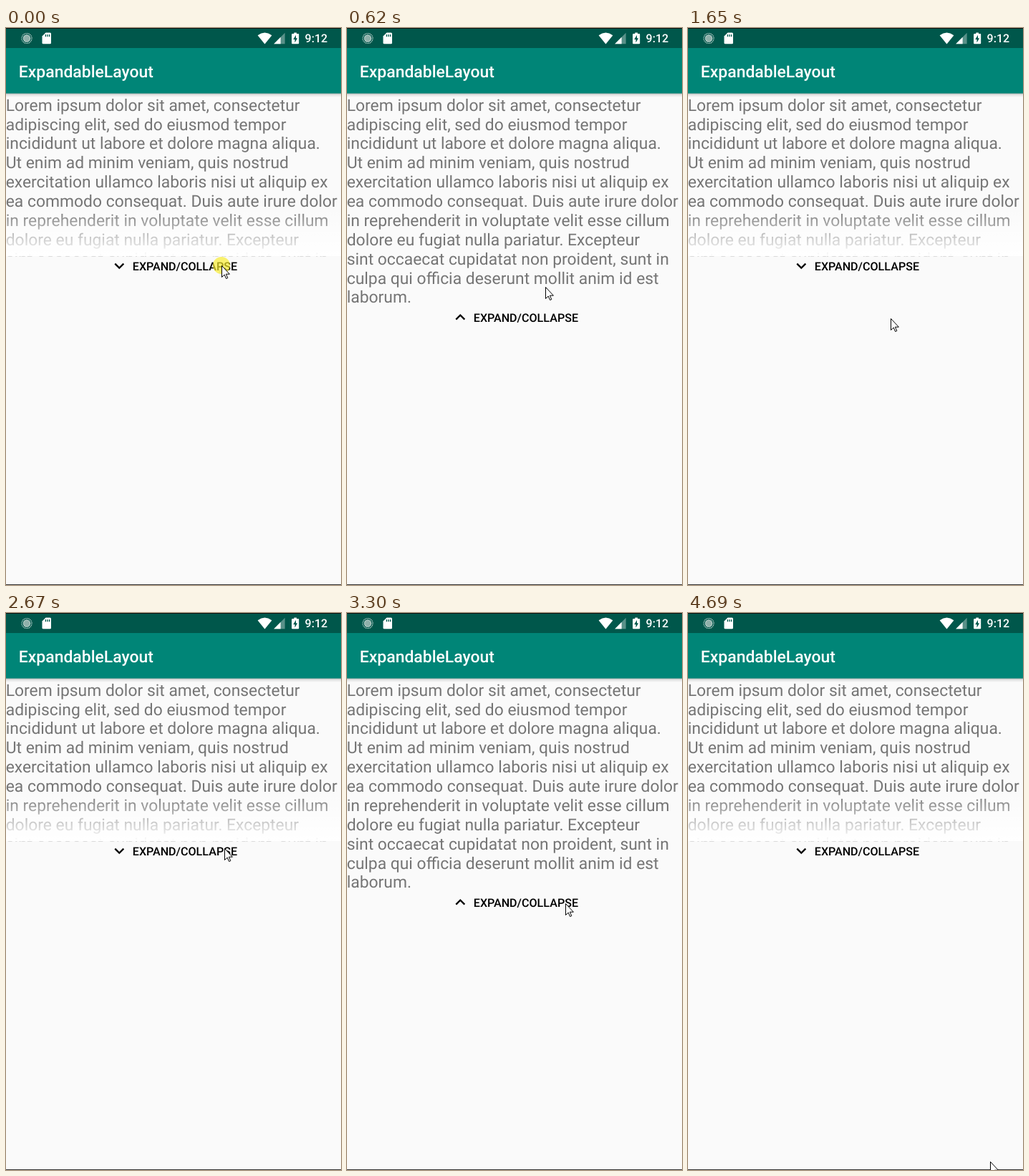
An HTML page that plays this animation: 468 by 779 pixels, repeating every 4770 ms.

```html
<!DOCTYPE html>
<html lang="en">
<head>
<meta charset="utf-8">
<title>Expandable layout</title>
<style>
  html, body { margin: 0; width: 100%; height: 100%; overflow: hidden; background: #fafafa; }
  svg { display: block; width: 100%; height: 100%; }
  text { font-family: Roboto, "Noto Sans", sans-serif; text-rendering: geometricPrecision; white-space: pre; }
  .bold { font-weight: 500; }
</style>
</head>
<body>
<svg viewBox="0 0 468 779">
  <defs>
    <linearGradient id="fadeFill" x2="0" y2="1">
      <stop offset="0" stop-color="#fff" stop-opacity="0"/>
      <stop offset="1" stop-color="#fff"/>
    </linearGradient>
    <linearGradient id="shadowFill" x2="0" y2="1">
      <stop offset="0" stop-opacity=".3"/>
      <stop offset=".4" stop-opacity=".1"/>
      <stop offset="1" stop-opacity="0"/>
    </linearGradient>
    <clipPath id="panelClip"><rect id="panel" y="91" width="468" height="228"/></clipPath>
  </defs>

  <rect width="468" height="779" fill="#fafafa"/>
  <g clip-path="url(#panelClip)">
    <g id="body" font-size="22.86" fill="#757575"></g>
    <rect id="fade" width="468" height="68" fill="url(#fadeFill)"/>
  </g>

  <g id="button">
    <path id="chevron" d="M4.59-3.41 0 1.17-4.59-3.41-6-2 0 4 6-2z"/>
    <text class="bold" x="249.9" y="20" font-size="16.1" text-anchor="middle">EXPAND/COLLAPSE</text>
  </g>

  <rect y="91" width="468" height="6" fill="url(#shadowFill)"/>
  <rect y="28" width="468" height="63.5" fill="#008577"/>
  <text class="bold" x="17.8" y="68.7" font-size="22.95" fill="#fff">ExpandableLayout</text>

  <rect width="468" height="28" fill="#00574b"/>
  <g fill="#fff">
    <g fill="none" stroke="#c4d8d4">
      <circle cx="29" cy="14.5" r="5.2" stroke="none" fill="#8fb0aa"/>
      <circle cx="29" cy="14.5" r="7" stroke-width="1.2" stroke-dasharray="1.3 .9"/>
      <circle cx="29" cy="14.5" r="4.6" stroke-width="1.2" stroke-dasharray="1.2 .8"/>
    </g>
    <path d="M55.5 6.5H61.5Q63 6.5 63 8V20.7Q63 22.2 61.5 22.2H52Q50.5 22.2 50.5 20.7V11.5z"/>
    <path d="M55.4 9v3.2M58 9v3.2M60.6 9v3.2" stroke="#00574b" stroke-width="1.3"/>
    <path d="M351.6 10.2Q361.5 2.8 371.4 10.2L361.5 22.4z"/>
    <path d="M389.6 6.8V22.2H374.2z" opacity=".35"/>
    <path d="M383.6 12.8V22.2H374.2z"/>
    <path d="M402.3 6.4H406V8H408.2Q409.2 8 409.2 9V21.3Q409.2 22.3 408.2 22.3H400.1Q399.1 22.3 399.1 21.3V9Q399.1 8 400.1 8H402.3z"/>
    <path d="M405 9.8 401.3 15.9H403.5V20.4L407.1 14.2H405z" fill="#00574b"/>
    <text class="bold" x="417.6" y="20.4" font-size="16">9:12</text>
  </g>
  <rect width="468" height="1" fill="#111"/>
  <rect y="778" width="468" height="1" fill="#333"/>

  <circle id="press" r="12" fill="#f8ec2c" opacity=".68"/>
  <path id="cursor" d="M.5.5V16.5L4.2 13 6.6 18.5 8.8 17.6 6.4 12.2H11.4z" fill="#fff" stroke="#000"/>
</svg>

<script>
const LOOP = 4770, TICKS = 61, TICK = LOOP / TICKS, LEAD = 6;
const TOP = 91.7, CLOSED = 227.5, OPEN = 299.3, FADE = 68;

const lines = [
  "Lorem ipsum dolor sit amet, consectetur",
  "adipiscing elit, sed do eiusmod tempor",
  "incididunt ut labore et dolore magna aliqua.",
  "Ut enim ad minim veniam, quis nostrud",
  "exercitation ullamco laboris nisi ut aliquip ex",
  "ea commodo consequat. Duis aute irure dolor",
  "in reprehenderit in voluptate velit esse cillum",
  "dolore eu fugiat nulla pariatur. Excepteur",
  "sint occaecat cupidatat non proident, sunt in",
  "culpa qui officia deserunt mollit anim id est",
  "laborum."
];

// Pointer stops: tick, x, y
const path = [
  [0, 301, 332], [7, 301, 332], [8, 277, 362], [10, 265, 400], [12, 268, 430],
  [14, 277, 424], [16, 283, 406], [22, 283, 406], [24, 294, 372], [26, 307, 310],
  [29, 305, 334], [31, 305, 328], [33, 305, 328], [34, 305, 329], [41, 305, 329],
  [42, 305, 406], [44, 303, 417], [45, 303, 417], [48, 304, 405], [56, 304, 405],
  [57, 309, 424], [58, 330, 500], [59, 376, 640], [60, 422, 767]
];
// Panel moves: first tick, last tick, direction
const toggles = [[0, 4, 1], [18, 21, -1], [36, 39, 1], [53, 55, -1]];
const presses = [0, 17, 36, 52];

const $ = id => document.getElementById(id);
const clamp = v => Math.max(0, Math.min(1, v));
const ease = v => (1 - Math.cos(Math.PI * clamp(v))) / 2;

lines.forEach((line, i) => {
  const text = document.createElementNS("http://www.w3.org/2000/svg", "text");
  text.setAttribute("x", -0.3);
  text.setAttribute("y", 115.7 + 26.87 * i);
  text.textContent = line;
  $("body").append(text);
});

function pointer(tick) {
  const next = Math.max(1, path.findIndex(p => p[0] >= tick));
  const [t0, x0, y0] = path[next - 1], [t1, x1, y1] = path[next];
  const k = (tick - t0) / (t1 - t0);
  return [Math.round(x0 + (x1 - x0) * k), Math.round(y0 + (y1 - y0) * k)];
}

function draw(ms) {
  const tick = Math.min(TICKS - 1, Math.floor((ms % LOOP + LEAD) / TICK));
  const open = toggles.reduce((sum, [a, b, dir]) => sum + dir * ease((tick - a) / (b - a)), 0);
  const height = CLOSED + (OPEN - CLOSED) * open;
  const bottom = TOP + height;
  const last = toggles.filter(([a]) => tick > a).pop();
  const up = last && last[2] > 0;
  const [x, y] = pointer(tick);

  $("panel").setAttribute("height", bottom - 91);
  $("fade").setAttribute("y", bottom - FADE);
  $("fade").setAttribute("opacity", 1 - open);
  $("button").setAttribute("transform", `translate(0 ${bottom})`);
  $("chevron").setAttribute("transform", `translate(158.3 13.5) scale(${up ? -1.1375 : 1.1375})`);
  $("cursor").setAttribute("transform", `translate(${x} ${y})`);
  $("press").setAttribute("transform", `translate(${x} ${y})`);
  $("press").setAttribute("visibility", presses.includes(tick) ? "visible" : "hidden");
}

const start = performance.now();
function loop() {
  draw(performance.now() - start);
  requestAnimationFrame(loop);
}
loop();
</script>
</body>
</html>
```
